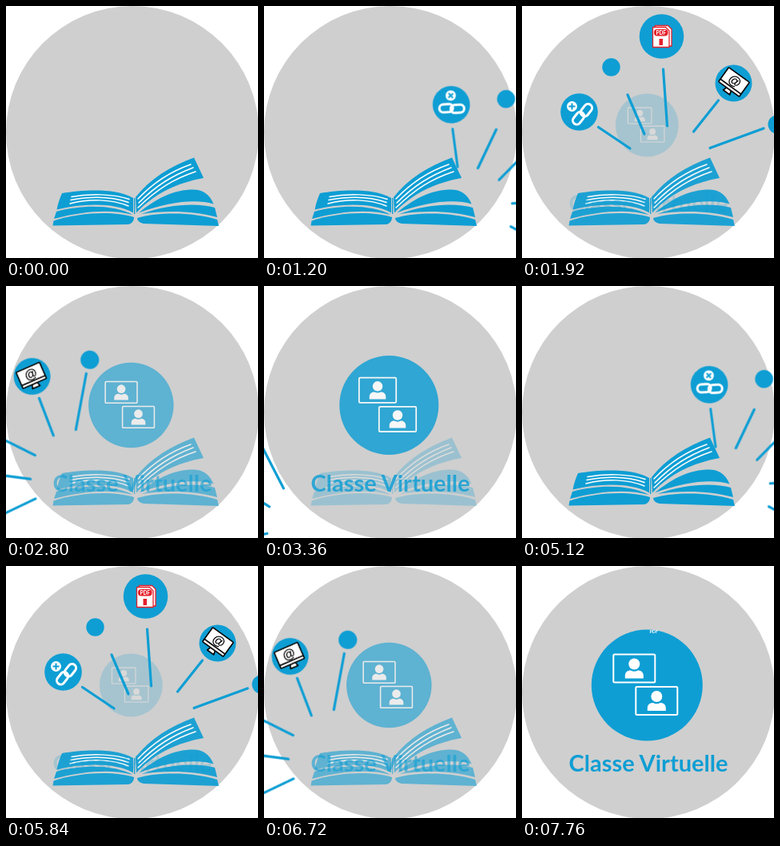
An HTML page that plays this animation: 315x315 px, repeating every 7.84 s.

```html
<!DOCTYPE html>
<html lang="fr">
<head>
<meta charset="utf-8">
<title>Classe Virtuelle</title>
<style>
  html, body { margin: 0; width: 100%; height: 100%; overflow: hidden; background: #fff; }
  svg { display: block; width: 100vw; height: 100vh; }
  text { font-family: Lato, "Open Sans", sans-serif; font-weight: 700; text-anchor: middle; }
  .blue { fill: #0e9ed4; }
  .white { fill: #fff; }
  .ray { stroke: #0e9ed4; stroke-width: 3.2; stroke-linecap: round; }
  .rule { fill: none; stroke: #fff; stroke-width: 1.5; stroke-linecap: round; }
  .ink { fill: #fff; stroke: #000; stroke-width: 1.6; stroke-linejoin: round; }
  .red { fill: #fff; stroke: #e5202b; stroke-width: 1.3; stroke-linejoin: round; }
  .link { fill: none; stroke: #fff; stroke-width: 3; }
  .frame { fill: none; stroke: #fff; stroke-width: 2; }
  .at { font-family: "Liberation Sans", sans-serif; font-size: 16px; }
</style>
</head>
<body>
<svg viewBox="0 0 315 315">
  <defs>
    <g id="screen">
      <rect class="frame" x="-26" y="-17.5" width="52" height="35" rx="1.5"/>
      <circle class="white" cy="-5.5" r="7"/>
      <path class="white" d="M-11.5 12.5V9C-11.5 4.5-8 2.5-4.5 2.5Q0 5 4.5 2.5C8 2.5 11.5 4.5 11.5 9V12.5Z"/>
    </g>
  </defs>

  <circle cx="158" cy="158" r="158" fill="#cfcfcf"/>

  <g id="book">
    <g class="blue">
      <path d="M70 234C96 230 136 227 159 240V258.5C138 246 97 246 63.5 254.5C65 247 67 241 70 234Z"/>
      <path d="M63 257C94 248 136 248 158.500 261C132 253.500 97 256 60 266Z"/>
      <path d="M59.500 268.500C92 258 134 256 160 264C160 269 157 272 153 273L58.500 274.500Z"/>
      <path d="M160 240H161.300V260H160Z"/>
      <path d="M162 239C180 216 206 200 235 189.500L247 215C214 221 186 234 163 258.500Z"/>
      <path d="M166 258.500C185 243 205 231 230 229.500C245 228.500 254 234 259.500 247.500C238 241 205 244 166 258.500Z"/>
      <path d="M169 260C205 247 240 246 261 252L264 264C236 256 200 255 169 260Z"/>
      <path d="M164 265C192 257 236 258 264 267L266 275L172 272C167 271 164 268 164 265Z"/>
    </g>
    <g class="rule">
      <path d="M82 238.500C105 234 135 235 154 241.500"/>
      <path d="M81 242.500C105 238 132 238 153 245.500"/>
      <path d="M80 247C104 241 131 241 153 250"/>
      <path d="M165 241C185 220 205 207 231 198"/>
      <path d="M166 246C188 224 208 212 234 202"/>
      <path d="M165 252C190 228 210 216 237 207"/>
    </g>
  </g>

  <g id="lesson">
    <g id="badge">
      <circle class="blue" r="69.500"/>
      <use href="#screen" x="-16" y="-21"/>
      <use href="#screen" x="12" y="19.500"/>
      <text id="tag" class="white" x="8.500" y="-65" font-size="5.500">PDF</text>
    </g>
    <text class="blue" x="158" y="257" font-size="29">Classe Virtuelle</text>
  </g>

  <g id="wheel">
    <g class="ray">
      <path d="M95.500 151.500L135 178"/>
      <path d="M132 111L153 160"/>
      <path d="M176.500 79L181.500 150"/>
      <path d="M245.500 118L214.500 157"/>
      <path d="M302 153L235 177.500"/>
    </g>
    <g class="blue">
      <circle cx="71.500" cy="132.500" r="23.300"/>
      <circle cx="111.500" cy="76.500" r="11.200"/>
      <circle cx="174.500" cy="38" r="27.800"/>
      <circle cx="264.500" cy="96.500" r="23"/>
      <circle cx="319" cy="148" r="11.500"/>
    </g>
    <g transform="translate(75 135.500) rotate(-52)">
      <rect class="link" x="-15" y="-5.500" width="17" height="10" rx="5"/>
      <rect class="link" x="-1" y="-4" width="17" height="10" rx="5"/>
    </g>
    <circle class="white" cx="62.500" cy="125.500" r="6.500"/>
    <path d="M58.500 125.500H66.500M62.500 121.500V129.500" stroke="#0e9ed4" stroke-width="2"/>
    <g transform="translate(174.500 38)">
      <path class="red" d="M-8-13.500H8L12.500-9V12H-8Z"/>
      <path class="red" d="M-11-11.500H5L9.500-7V13.500H-11Z"/>
      <rect x="-9.500" y="-9" width="17.500" height="8.500" rx="4" fill="#e5202b"/>
      <text class="white" x="-.800" y="-2.500" font-size="6.500" font-weight="900">PDF</text>
      <rect x="-3" y="3" width="4.500" height="8" fill="#e5202b"/>
    </g>
    <g transform="translate(265 95) rotate(36)">
      <path class="ink" d="M-3.500 11H3.500L5 16H-5Z"/>
      <rect class="ink" x="-16" y="-11" width="32" height="22" rx="1"/>
      <path class="ink" d="M-16 7H16"/>
      <text class="at" y="3.500">@</text>
    </g>
  </g>
</svg>
<script>
const STEP = 80, HOLD = 320, CYCLE = 3920, LAST = 45;
const $ = id => document.getElementById(id);
const clamp = v => Math.min(1, Math.max(0, v));

function draw(ms) {
  const t = ms % CYCLE;
  const k = t < HOLD ? 0 : Math.floor((t - HOLD) / STEP) + 1;
  const fade = clamp((k - 15) / (LAST - 16));
  const scale = 1 - 0.018 * (LAST - k);
  $("wheel").setAttribute("transform", `rotate(${-5.4 * (k - 21)} 163 308)`);
  $("badge").setAttribute("transform", `translate(156.3 149) scale(${scale})`);
  $("lesson").setAttribute("opacity", fade);
  $("book").setAttribute("opacity", 1 - fade ** 1.6);
  $("tag").setAttribute("opacity", k > LAST - 5 ? 1 : 0);
}

const start = performance.now();
function tick() {
  draw(performance.now() - start);
  requestAnimationFrame(tick);
}
tick();
</script>
</body>
</html>
```
